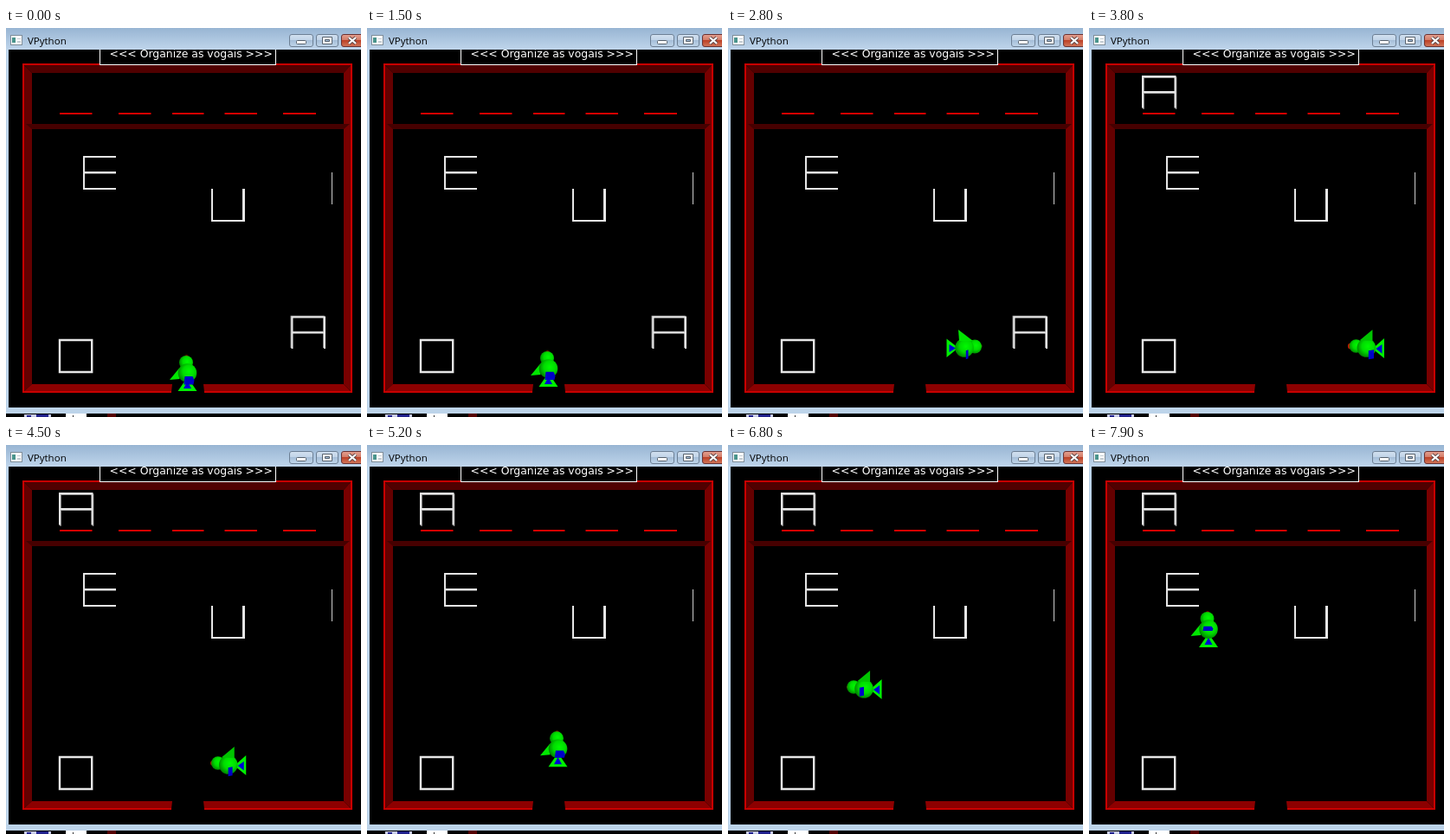
An HTML page for the animation above (8 s loop, 410 by 450 pixels).

```html
<!DOCTYPE html>
<html lang="pt">
<head>
<meta charset="utf-8">
<style>
html, body { margin: 0; width: 100%; height: 100%; overflow: hidden; background: #000; }
svg { display: block; width: 410px; height: 450px; }
</style>
</head>
<body>
<svg viewBox="0 0 410 450">
  <defs>
    <linearGradient id="bar" x2="0" y2="1">
      <stop offset="0" stop-color="#98b5d3"/><stop offset="1" stop-color="#bfd5eb"/>
    </linearGradient>
    <linearGradient id="btn" x2="0" y2="1">
      <stop offset="0" stop-color="#d3e1f0"/><stop offset=".48" stop-color="#c0d3e7"/>
      <stop offset=".5" stop-color="#a6bfd9"/><stop offset="1" stop-color="#c1d6ea"/>
    </linearGradient>
    <linearGradient id="close" x2="0" y2="1">
      <stop offset="0" stop-color="#e5a191"/><stop offset=".48" stop-color="#d27a65"/>
      <stop offset=".5" stop-color="#bd4127"/><stop offset="1" stop-color="#d2795c"/>
    </linearGradient>
    <radialGradient id="ball" cx=".58" cy=".42" r=".64">
      <stop offset="0" stop-color="#00fa00"/><stop offset=".5" stop-color="#00dc00"/>
      <stop offset="1" stop-color="#007800"/>
    </radialGradient>
    <clipPath id="client"><path d="M3 25H410V439H3Z"/></clipPath>
  </defs>

  <!-- window -->
  <path fill="url(#bar)" d="M0 0H410V25H0Z"/>
  <path fill="#bdd4ea" d="M0 25H3V439H410V446H0Z"/>
  <path fill="#000" d="M3 25H410V439H3Z"/>
  <path fill="#c8cce8" d="M21 447H52V450H21Z"/>
  <path fill="#20208c" d="M24 448H29V450H24ZM35 447H49V450H35Z"/>
  <path fill="#fff" d="M69 446H93V450H69Z"/>
  <path fill="#333" d="M77 448H78V450H77Z"/>
  <path fill="#500" d="M117 446H127V450H117Z"/>
  <rect x="5.500" y="8.500" width="13" height="11" fill="#fbfcfd" stroke="#7f8d99"/>
  <path fill="#4a948c" d="M7 11H11V17H7Z"/>
  <path fill="#c4ccd2" d="M13 12H17V13H13ZM13 15H17V17H13Z"/>
  <text x="25" y="19" font-family="'Open Sans', 'Noto Sans', sans-serif" font-size="11.500" fill="#000">VPython</text>
  <g stroke="#6c7f94">
    <rect x="327.500" y="7.500" width="27" height="14" rx="2.500" fill="url(#btn)"/>
    <rect x="358.500" y="7.500" width="25" height="14" rx="2.500" fill="url(#btn)"/>
    <rect x="387.500" y="7.500" width="27" height="14" rx="2.500" fill="url(#close)" stroke="#6a3030"/>
    <rect x="335.500" y="14.500" width="11" height="4" rx="1" fill="#fff" stroke="#56616d"/>
    <path d="M365.500 10.500h11v8h-11zM368.500 13.500h5v2h-5z" fill="#fff" fill-rule="evenodd" stroke="#56616d"/>
    <path d="M396 11L404 18M404 11L396 18" stroke="#5c4444" stroke-width="4"/>
    <path d="M396 11L404 18M404 11L396 18" stroke="#fff" stroke-width="2.200"/>
  </g>

  <g clip-path="url(#client)">
    <!-- walls -->
    <path fill="#500000" d="M20 42H399L390 52H30Z"/>
    <path fill="#640000" d="M20 42L30 52V412L20 421Z"/>
    <path fill="#780000" d="M399 42L390 52V412L399 421Z"/>
    <path fill="#8c0000" d="M20 421L30 412H192L191 421ZM229 421L228 412H390L399 421Z"/>
    <path fill="#460000" d="M23 111H397L390 117H30Z"/>
    <g fill="none" stroke="#d80000" stroke-width="2">
      <path stroke="#c80000" d="M191 421H20V42H399V421H229"/>
      <path d="M62 99h37.500M130 99h37.500M192 99h36.500M252.500 99h37.500M320 99h38"/>
    </g>
    <!-- letters -->
    <g fill="none" stroke="#e6e6e6" stroke-width="2">
      <path d="M127 149H90V186H127"/>
      <path stroke-width="2.500" d="M90 167.250H127"/>
      <path d="M238 186V223H275"/>
      <path stroke-width="3" d="M274.500 186V224"/>
      <path stroke-width="2.400" d="M62 361H99.200V398H62Z"/>
      <path stroke="#ccc" stroke-width="1" d="M376.500 167V204"/>
      <g id="a">
        <path id="back" stroke="#a0a0a0" stroke-width="1.600" d="M0 36.500V0H37.500V36.500M0 18H37.500"/>
        <path d="M0 36.500V0H37.500V36.500M0 18H37.500"/>
      </g>
    </g>
    <rect x="108.500" y="20.500" width="203" height="22" fill="#000" stroke="#fff"/>
    <text x="119.500" y="34" font-family="'DejaVu Sans', sans-serif" font-size="12.430" fill="#fff">&lt;&lt;&lt; Organize as vogais &gt;&gt;&gt;</text>

    <!-- bird, one drawing per heading, origin at the body centre -->
    <g id="bird">
      <g id="up">
        <path fill="#00e800" d="M-20.500 8L-9 -6V7Z"/>
        <path fill="#00f000" d="M0 5L-11 21H11Z"/>
        <path fill="#0000d8" d="M0 10L-4.500 18H4.500Z"/>
        <circle cx="-1" cy="-18.500" r="2.200" fill="#a00000"/>
        <circle cx="-1.500" cy="-12" r="8" fill="url(#ball)"/>
        <circle r="10.800" fill="url(#ball)"/>
      </g>
      <g id="right">
        <path fill="#00f000" d="M-7 0L-20.500 -10.500V11Z"/>
        <path fill="#0000d8" d="M-10 .5L-17.500 -4V5Z"/>
        <circle cx="18.500" cy="-2" r="2" fill="#407000"/>
        <circle cx="12" cy="-1.500" r="8" fill="url(#ball)"/>
        <circle r="10.800" fill="url(#ball)"/>
        <path fill="#00e400" d="M-7 -21L-6 -8L10 -8Z"/>
      </g>
      <g id="left">
        <path fill="#00f000" d="M7 1L20.500 -11V12Z"/>
        <path fill="#0000d8" d="M11 1L18 -4V6.500Z"/>
        <circle id="beak" cx="-18" cy="-2" r="3.500" fill="#c01800"/>
        <circle cx="-12" cy="-2" r="7.800" fill="url(#ball)"/>
        <circle r="10.800" fill="url(#ball)"/>
        <path fill="#00c400" d="M7 -21V-8L-8 -8.500Z"/>
      </g>
      <path id="leg" fill="#0000c8"/>
    </g>
  </g>
</svg>
<script>
const LOOP = 8000, STEP = 100, COLLECT = 3300;
const el = id => document.getElementById(id);
const place = (id, x, y) => el(id).setAttribute('transform', `translate(${x} ${y})`);

// start, end, heading, x and y at the start, x and y at the end
const moves = [
  [0, 1100, 'up', 209.5, 399, 209.5, 399],
  [1200, 1400, 'up', 209.5, 397, 209.5, 397],
  [1500, 1800, 'up', 209.5, 394, 209.5, 370],
  [1900, 2100, 'right', 210.5, 370, 210.5, 370],
  [2200, 2800, 'right', 219.5, 370, 273, 370],
  [2900, 3400, 'right', 283, 370, 329.5, 370],
  [3500, 3600, 'left', 338.5, 370, 338.5, 370],
  [3700, 4800, 'left', 329.5, 370, 229.5, 370],
  [4900, 5000, 'up', 220.5, 370, 220.5, 370],
  [5100, 5900, 'up', 220.5, 360.5, 220.5, 287],
  [6000, 6100, 'left', 220.5, 282, 220.5, 282],
  [6200, 6900, 'left', 211.5, 282, 148, 282],
  [7000, 7100, 'up', 138, 281.5, 138, 281.5],
  [7200, 7900, 'up', 138, 273, 138, 213]
];

function legShape(heading, x, y) {
  // the leg points at the viewer, so perspective shifts it from the centre
  const dx = (x - 210) * 0.05, dy = (y - 225) * 0.05;
  if (heading === 'up') {
    const h = 2.5 + Math.abs(dy) * 0.25;
    return `M${dx * 0.7 - 3} ${dy - h}h9l2 ${h}l-1 ${h}h-11z`;
  }
  const w = heading === 'left' ? 2 + Math.abs(dx) * 0.2 : 2 - Math.abs(dx) * 0.2;
  return `M${dx - w} ${dy - 4}l${w * 2} -1v10l${-w * 2} 1z`;
}

function placeLetter(x, y) {
  place('a', x, y);
  place('back', (190 - x) * 0.008, (210 - y) * 0.008);
}

function draw(time) {
  const t = Math.floor(time / STEP) * STEP;
  const [t0, t1, heading, x0, y0, x1, y1] = moves.findLast(m => m[0] <= t);
  const k = Math.min(1, (t - t0) / (t1 - t0));
  const x = x0 + (x1 - x0) * k, y = y0 + (y1 - y0) * k;
  place('bird', x, y);
  for (const id of ['up', 'right', 'left']) {
    el(id).setAttribute('display', id === heading ? 'inline' : 'none');
  }
  el('beak').setAttribute('r', 2 + Math.max(0, x - 210) * 0.014);
  el('leg').setAttribute('d', legShape(heading, x, y));
  if (t < COLLECT) placeLetter(330.5, 334.5);
  else placeLetter(62, 56);
}

const start = performance.now();
function tick() {
  draw((performance.now() - start) % LOOP);
  requestAnimationFrame(tick);
}
draw(0);
requestAnimationFrame(tick);
</script>
</body>
</html>
```
